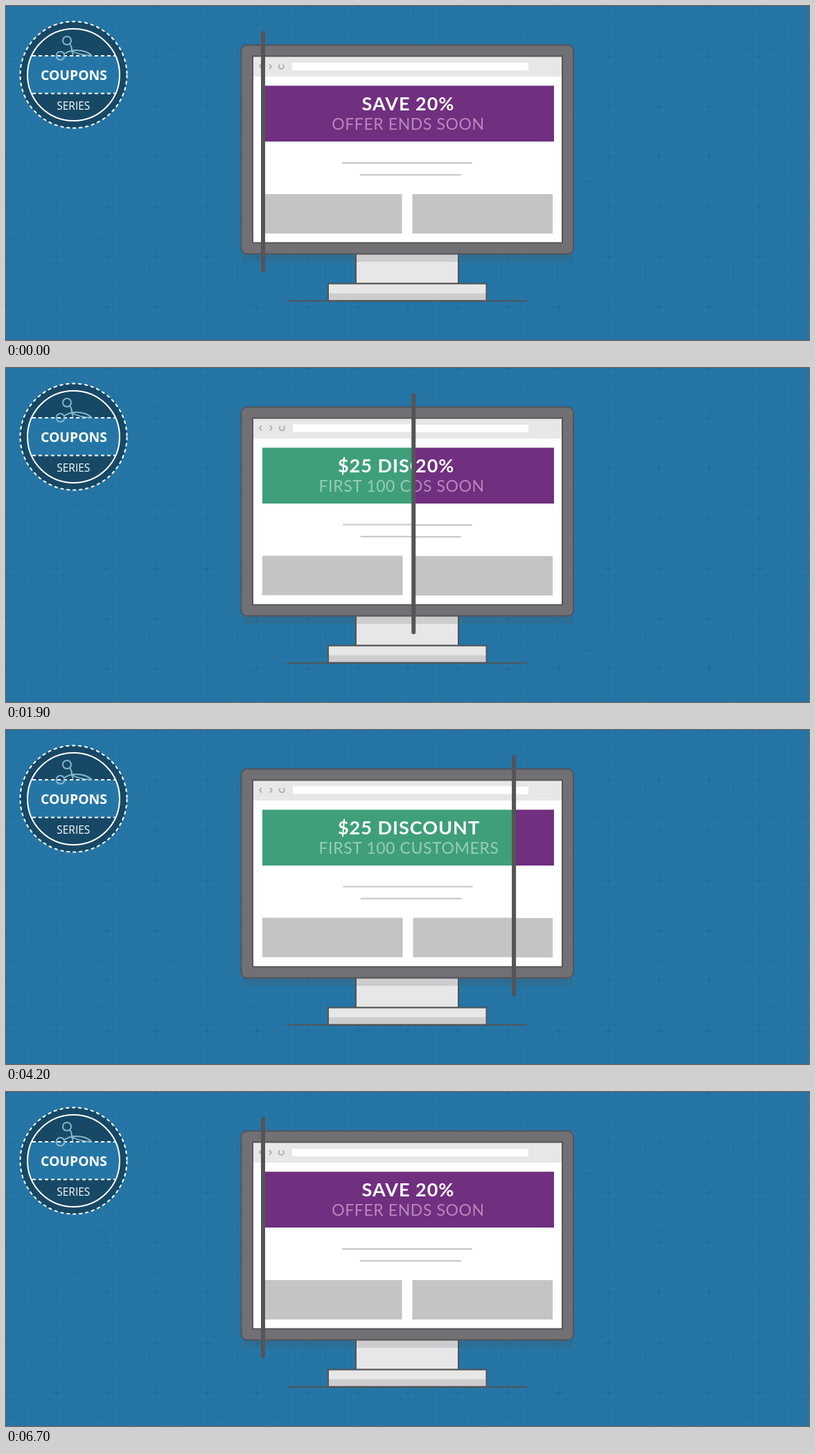
An HTML page for the animation above (6800 ms loop, 1159 px wide and 483 px high).

```html
<!DOCTYPE html>
<html lang="en">
<head>
<meta charset="utf-8">
<title>Coupons series</title>
<style>
  html, body { margin: 0; width: 100%; height: 100%; overflow: hidden; background: #2576a6; }
  svg { display: block; width: 1159px; height: 483px; }
  text { text-anchor: middle; }
  .badge { font-family: "Open Sans", "Noto Sans", sans-serif; fill: #fff; }
  .title { font: 700 27px Lato, sans-serif; letter-spacing: 1px; fill: #fff; }
  .sub { font: 400 23px Lato, sans-serif; letter-spacing: .6px; }
  .edge { stroke: #555457; stroke-width: 2; }
  .icon { fill: none; stroke: #a3a3a6; stroke-width: 1.5; }
  .scissors { fill: none; stroke: #85b6cb; stroke-width: 2; }
  .dash { fill: none; stroke: #fff; stroke-width: 2; stroke-dasharray: 5 4; }
</style>
</head>
<body>
<svg viewBox="0 0 1159 483">
  <defs>
    <pattern id="grid" width="9.06" height="9.06" patternUnits="userSpaceOnUse">
      <path d="M0 .5H9.06M.5 0V9.06" stroke="#1f6a9a" stroke-opacity=".4"/>
    </pattern>
    <pattern id="marks" x="36.25" y="36.25" width="72.45" height="72.45" patternUnits="userSpaceOnUse">
      <path d="M31.5 36.5h10M36.5 31.5v10" stroke="#1f6796" stroke-opacity=".65" stroke-width="1.5"/>
    </pattern>
    <clipPath id="inner"><circle cx="97.5" cy="99.5" r="66.5"/></clipPath>
    <clipPath id="reveal"><rect id="mask" x="356" y="73" width="15" height="270"/></clipPath>
  </defs>

  <rect width="1159" height="483" fill="#2576a6"/>
  <rect width="1159" height="483" fill="url(#grid)"/>
  <rect width="1159" height="483" fill="url(#marks)"/>

  <g class="badge">
    <circle cx="97.5" cy="99.5" r="77" fill="#174865"/>
    <circle class="dash" cx="97.5" cy="99.5" r="77"/>
    <rect x="30" y="72" width="135" height="54.5" fill="#2576a6" clip-path="url(#inner)"/>
    <circle cx="97.5" cy="99.5" r="66.5" fill="none" stroke="#fff" stroke-width="2"/>
    <path class="dash" d="M38 72H158M38 126.5H158"/>
    <g class="scissors">
      <circle cx="88" cy="50" r="6"/>
      <circle cx="78.5" cy="72" r="6"/>
      <path d="M92 55Q95 58 95 65L97 71M84 69Q92 64 101 64Q116 64 124 72M95 65Q105 71 124 72"/>
    </g>
    <text x="98" y="107" font-size="19.4" font-weight="700">COUPONS</text>
    <text x="97.3" y="150" font-size="15.5">SERIES</text>
  </g>

  <rect x="341" y="359" width="477" height="11" fill="#555457" opacity=".18"/>
  <rect x="505" y="358" width="148" height="43" fill="#e7e7e8"/>
  <rect x="505" y="358" width="148" height="12" fill="#cdcdcf"/>
  <rect class="edge" x="505" y="358" width="148" height="43.5" fill="none"/>
  <rect x="465" y="401.5" width="228.5" height="25" fill="#e7e7e8"/>
  <rect x="465" y="415.5" width="228.5" height="11" fill="#cdcdcf"/>
  <rect class="edge" x="465" y="401.5" width="228.5" height="25" fill="none"/>
  <path class="edge" d="M406 426.5H751.5"/>
  <rect class="edge" x="339.5" y="56.5" width="479.5" height="302" rx="8" fill="#717075"/>

  <g id="offer"></g>
  <g id="discount" clip-path="url(#reveal)"></g>
  <rect class="edge" x="356" y="72.5" width="447" height="270" fill="none"/>
  <path id="bar" d="M371 39V382" stroke="#555457" stroke-width="6" stroke-linecap="round"/>
</svg>

<script>
  const byId = id => document.getElementById(id);

  function page({ color, subColor, title, sub, center, dx, dy }) {
    return `
      <rect x="356" y="73" width="447" height="270" fill="#fff"/>
      <rect x="356" y="73" width="447" height="29" fill="#e7e7e8"/>
      <rect x="370" y="115.3" width="421" height="80.7" fill="${color}"/>
      <text class="title" x="${center}" y="151">${title}</text>
      <text class="sub" x="${center}" y="179" fill="${subColor}">${sub}</text>
      <g transform="translate(${dx} ${dy})">
        <path class="icon" d="M368 84l-3 3.5 3 3.5M380 84l3 3.5-3 3.5M399.5 84.5A3.6 3.6 0 1 1 395 84.6"/>
        <rect x="413" y="82" width="341" height="11" fill="#fff"/>
        <path d="M486 227H672M511.500 244.300H656" stroke="#c4c4c6" stroke-width="2" stroke-linecap="round"/>
        <path d="M369 272h202.500v57H369zM586.500 272H789v57H586.500z" fill="#c4c4c6"/>
      </g>`;
  }

  byId("offer").innerHTML = page({
    color: "#712f7f", subColor: "#b788bd", title: "SAVE 20%", sub: "OFFER ENDS SOON",
    center: 580.5, dx: 0, dy: 0
  });
  byId("discount").innerHTML = page({
    color: "#3f9f7a", subColor: "#98cdb6", title: "$25 DISCOUNT", sub: "FIRST 100 CUSTOMERS",
    center: 581.5, dx: 1, dy: -.6
  });

  const LOOP = 6800, TICK = 100, STEPS = 29;
  const LEFT = 371, RIGHT = 791;
  const OUT = 500, BACK = 3900;

  // Steps taken since a sweep began, the first one landing at its start.
  const stepsSince = (time, start) =>
    Math.max(0, Math.min(STEPS, Math.floor((time - start) / TICK) + 1));

  function draw() {
    const time = performance.now() % LOOP;
    const progress = (stepsSince(time, OUT) - stepsSince(time, BACK)) / STEPS;
    const x = LEFT + (RIGHT - LEFT) * progress;
    byId("bar").setAttribute("d", `M${x} 39V382`);
    byId("mask").setAttribute("width", x - 356);
    requestAnimationFrame(draw);
  }
  draw();
</script>
</body>
</html>
```
